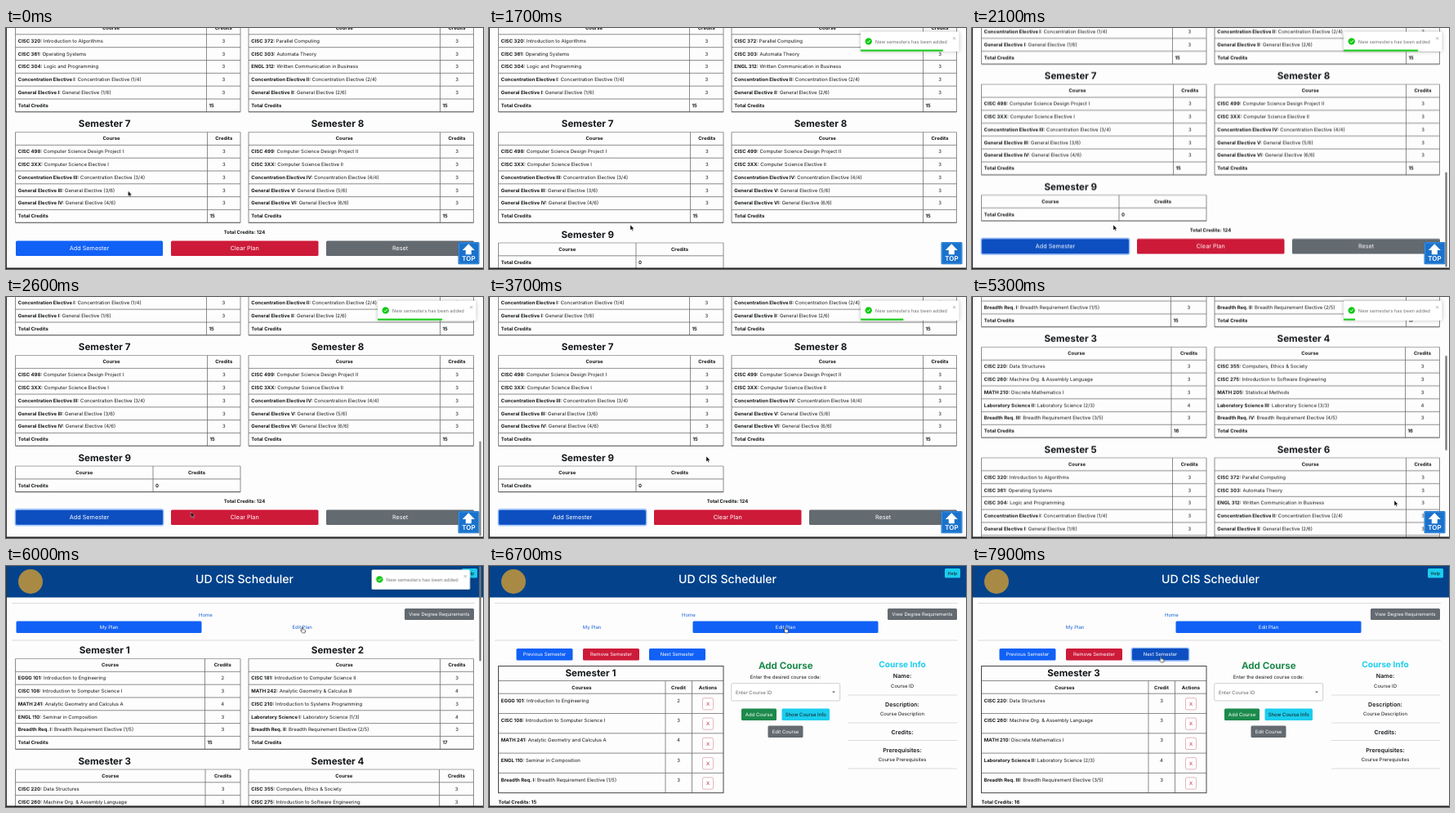
Recreate the animation shown at these times as an HTML page. Size 584 by 295 pixels, loop 8000 ms.

```html
<!DOCTYPE html>
<html lang="en">
<head>
<meta charset="utf-8">
<title>Scheduler</title>
<style>
html, body { margin: 0; width: 100%; height: 100%; overflow: hidden; background: #fdfdfd; }
svg { display: block; width: 584px; height: 295px; font-family: Inter, Roboto, sans-serif; text-rendering: geometricPrecision; }
.loop, .step { animation: 8s linear infinite; }
.step { animation-timing-function: step-end; }

#page { animation-name: scroll; }
@keyframes scroll {
  0%, 21.5% { transform: translateY(-392.5px); animation-timing-function: ease-in-out; }
  25.9%, 26.4% { transform: translateY(-451px); animation-timing-function: ease-out; }
  30%, 58.75% { transform: translateY(-448.5px); animation-timing-function: cubic-bezier(.35, .15, .7, .7); }
  66.25% { transform: translateY(-188.3px); animation-timing-function: cubic-bezier(.3, .4, .6, 1); }
  71.5%, 100% { transform: translateY(0); }
}
#bar { animation-name: thumb, bar; }
@keyframes thumb {
  0%, 21.5% { transform: translateY(155px); animation-timing-function: ease-in-out; }
  25.9%, 58.75% { transform: translateY(176px); animation-timing-function: cubic-bezier(.35, .15, .7, .7); }
  66.25% { transform: translateY(71.5px); animation-timing-function: cubic-bezier(.3, .4, .6, 1); }
  71.5%, 100% { transform: translateY(0); }
}
@keyframes bar {
  0%, 21.5% { opacity: 0; }
  22.5%, 32% { opacity: 1; }
  35.5%, 58% { opacity: 0; }
  58.75%, 76.5% { opacity: 1; }
  79.5%, 100% { opacity: 0; }
}
#top { animation-name: until-top; }
@keyframes until-top { 0% { visibility: visible; } 68.75%, 100% { visibility: hidden; } }
#plan { animation-name: plan; }
@keyframes plan { 0% { visibility: visible; } 82.5%, 100% { visibility: hidden; } }
#edit { animation-name: edit; }
@keyframes edit { 0% { opacity: 0; } 82.5%, 100% { opacity: 1; } }
#sem9 { animation-name: sem9; }
@keyframes sem9 { 0% { opacity: 0; } 11.25%, 100% { opacity: 1; } }
#foot { animation-name: foot; }
@keyframes foot { 0% { transform: none; } 11.25%, 100% { transform: translateY(56px); } }
#e1 { animation-name: e1; }
@keyframes e1 { 0% { opacity: 1; } 93.75%, 100% { opacity: 0; } }
#e2 { animation-name: e2; }
@keyframes e2 { 0% { opacity: 0; } 93.75% { opacity: 1; } 97.5%, 100% { opacity: 0; } }
#e3 { animation-name: e3; }
@keyframes e3 { 0% { opacity: 0; } 97.5%, 100% { opacity: 1; } }

#add { animation-name: add; }
@keyframes add { 0%, 6% { fill: #1161f6; } 7.8%, 100% { fill: #0d4fc0; } }
#addRing { animation-name: add-ring; }
@keyframes add-ring { 0%, 10% { opacity: 0; } 11%, 100% { opacity: 1; } }
#clear { animation-name: clear; }
@keyframes clear { 0%, 33% { fill: #cd1a39; } 35%, 39% { fill: #b0152f; } 41%, 100% { fill: #cd1a39; } }
#next { animation-name: next; }
@keyframes next { 0%, 91% { fill: #1161f6; } 92.8%, 100% { fill: #0d4fc0; } }
#nextRing { animation-name: next-ring; }
@keyframes next-ring { 0%, 93% { opacity: 0; } 94.5%, 100% { opacity: 1; } }

#toast { animation-name: toast; }
@keyframes toast {
  0%, 11.25% { transform: translateX(1125px); animation-timing-function: cubic-bezier(.215, .61, .355, 1); }
  16.5% { transform: translateX(-9.4px); animation-timing-function: cubic-bezier(.215, .61, .355, 1); }
  17.8% { transform: translateX(3.75px); animation-timing-function: cubic-bezier(.215, .61, .355, 1); }
  19.1% { transform: translateX(-1.9px); animation-timing-function: cubic-bezier(.215, .61, .355, 1); }
  20%, 73.5% { transform: none; opacity: 1; animation-timing-function: ease; }
  75.25% { transform: translateX(-7.5px); opacity: 1; animation-timing-function: ease; }
  82.25%, 100% { transform: translateX(750px); opacity: 0; }
}
#progress { animation-name: progress; transform-box: fill-box; transform-origin: left; }
@keyframes progress { 0%, 11% { transform: scaleX(1); } 73.5%, 100% { transform: scaleX(0); } }

#cursor { animation-name: cursor; animation-timing-function: ease-in-out; }
@keyframes cursor {
  0%, 1% { transform: translate(149.5px, 199.5px); }
  7.5%, 14.5% { transform: translate(131px, 267px); }
  20.5%, 28.5% { transform: translate(173px, 241px); }
  34%, 38% { transform: translate(236px, 267px); }
  45%, 49% { transform: translate(266px, 195px); }
  58%, 68.5% { transform: translate(517px, 249px); }
  74%, 86% { transform: translate(362px, 74.5px); }
  92.5%, 100% { transform: translate(230.5px, 110.5px); }
}
#arrow { animation-name: arrow; }
@keyframes arrow {
  0% { opacity: 1; } 6.3% { opacity: 0; } 11.25% { opacity: 1; } 33% { opacity: 0; } 39.3% { opacity: 1; }
  73% { opacity: 0; } 88% { opacity: 1; } 91.3%, 100% { opacity: 0; }
}
#hand { animation-name: hand; }
@keyframes hand {
  0% { opacity: 0; } 6.3% { opacity: 1; } 11.25% { opacity: 0; } 33% { opacity: 1; } 39.3% { opacity: 0; }
  73% { opacity: 1; } 88% { opacity: 0; } 91.3%, 100% { opacity: 1; }
}
</style>
</head>
<body>
<svg id="stage" viewBox="0 0 584 295"></svg>
<script>
const BLUE = '#1161f6', RED = '#cd1a39', GRAY = '#636a70', GREEN = '#1c8a4c', CYAN = '#1bcdee';
const INK = '#15181b', LINK = '#1a62d6', BODY = 5.96, HEAD = 11.6;

const plan = [
  [15, 243.5, 'EGGG 101|Introduction to Engineering|2', 'CISC 108|Introduction to Somputer Science I|3',
    'MATH 241|Analytic Geometry and Calculus A|4', 'ENGL 110|Seminar in Composition|3',
    'Breadth Req. I|Breadth Requirement Elective (1/5)|3'],
  [17, 531.5, 'CISC 181|Introduction to Computer Science II|3', 'MATH 242|Analytic Geometry & Calculus B|4',
    'CISC 210|Introduction to Systems Programming|3', 'Laboratory Science I|Laboratory Science (1/3)|4',
    'Breadth Req. II|Breadth Requirement Elective (2/5)|3'],
  [16, 244, 'CISC 220|Data Structures|3', 'CISC 260|Machine Org. & Assembly Language|3',
    'MATH 210|Discrete Mathematics I|3', 'Laboratory Science II|Laboratory Science (2/3)|4',
    'Breadth Req. III|Breadth Requirement Elective (3/5)|3'],
  [16, 530.5, 'CISC 355|Computers, Ethics & Society|3', 'CISC 275|Introduction to Software Engineering|3',
    'MATH 205|Statistical Methods|3', 'Laboratory Science III|Laboratory Science (3/3)|4',
    'Breadth Req. IV|Breadth Requirement Elective (4/5)|3'],
  [15, 245.5, 'CISC 320|Introduction to Algorithms|3', 'CISC 361|Operating Systems|3',
    'CISC 304|Logic and Programming|3', 'Concentration Elective I|Concentration Elective (1/4)|3',
    'General Elective I|General Elective (1/6)|3'],
  [15, 531.5, 'CISC 372|Parallel Computing|3', 'CISC 303|Automata Theory|3',
    'ENGL 312|Written Communication in Business|3', 'Concentration Elective II|Concentration Elective (2/4)|3',
    'General Elective II|General Elective (2/6)|3'],
  [15, 246.5, 'CISC 498|Computer Science Design Project I|3', 'CISC 3XX|Computer Science Elective I|3',
    'Concentration Elective III|Concentration Elective (3/4)|3', 'General Elective III|General Elective (3/6)|3',
    'General Elective IV|General Elective (4/6)|3'],
  [15, 531.5, 'CISC 499|Computer Science Design Project II|3', 'CISC 3XX|Computer Science Elective II|3',
    'Concentration Elective IV|Concentration Elective (4/4)|3', 'General Elective V|General Elective (5/6)|3',
    'General Elective VI|General Elective (6/6)|3'],
  [0, 180]
];

const esc = s => String(s).replace(/&/g, '&amp;');
const raw = (x, y, html, size, weight, fill, anchor) =>
  `<text x="${x}" y="${y + size * .364}" font-size="${size}" font-weight="${weight}" fill="${fill}" text-anchor="${anchor}">${html}</text>`;
const left = (x, y, s, weight = 400, fill = INK, size = BODY) => raw(x, y, esc(s), size, weight, fill, 'start');
const mid = (x, y, s, weight = 400, fill = INK, size = BODY) => raw(x, y, esc(s), size, weight, fill, 'middle');
const rect = (x, y, w, h, fill, attrs = '') => `<rect x="${x}" y="${y}" width="${w}" height="${h}" fill="${fill}" ${attrs}/>`;
const path = (d, stroke = '#666', w = .75) => `<path d="${d}" fill="none" stroke="${stroke}" stroke-width="${w}"/>`;
const rule = (x1, x2, y) => path(`M${x1} ${y}H${x2}`, '#ccc', .7);
const group = (id, cls, html) => `<g id="${id}" class="${cls}">${html}</g>`;
const ring = (id, x, y, w, h) =>
  rect(x - .6, y - .6, w + 1.2, h + 1.2, 'none', `rx="2" id="${id}" class="loop" stroke="#86b3fb" stroke-width="1.4"`);

function button(x, y, w, h, label, fill, { id = '', ink = '#fff', size = BODY } = {}) {
  const anim = id && `id="${id}" class="loop"`;
  return rect(x, y, w, h, fill, `rx="1.5" ${anim}`) + mid(x + w / 2, y + h / 2, label, 400, ink, size);
}

function course(x, y, row) {
  const [code, name] = row.split('|');
  return raw(x, y, `<tspan font-weight="700">${code}:</tspan> ${esc(name)}`, BODY, 400, INK, 'start');
}

function semester(i) {
  const [total, split, ...rows] = plan[i];
  const x = i % 2 ? 297 : 11.5, end = x + 275.5, pitch = 15.82;
  const head = 103 + 135.5 * (i >> 1), top = head + 10.5;
  const rowY = n => top + pitch * n + 7.7;
  const cx = (split + end) / 2, last = rows.length + 1;
  const headY = rowY(0) - .3, bottom = top + pitch * (last + 1);
  let out = mid(i % 2 ? 406 : 120.7, head, 'Semester ' + (i + 1), 700, INK, HEAD);
  out += mid((x + split) / 2, headY, 'Course', 700) + mid(cx, headY, 'Credits', 700);
  rows.forEach((row, n) => {
    out += course(x + 3.3, rowY(n + 1), row) + mid(cx, rowY(n + 1), row.split('|')[2]);
  });
  out += left(x + 3.3, rowY(last), 'Total Credits', 700) + left(split + 3, rowY(last), total, 700);
  for (let n = 1; n <= last; n++) out += path(`M${x} ${top + pitch * n}H${end}`);
  return out + path(`M${x} ${top}H${end}`, '#888')
    + path(`M${x} ${top}V${bottom}M${split} ${top}V${bottom}M${end} ${top}V${bottom}`)
    + path(`M${x} ${bottom}H${end}`, '#444', 1);
}

function editTable(i) {
  const [total, , ...rows] = plan[i];
  let out = mid(124.5, 130.5, 'Semester ' + (i + 1), 700, INK, HEAD);
  rows.forEach((row, n) => {
    const y = 164.5 + 24.3 * n;
    out += course(14.8, y, row) + mid(232, y, row.split('|')[2]);
  });
  return out + left(11.5, 289, 'Total Credits: ' + total, 700);
}

function header() {
  return rect(0, 0, 584, 38.5, '#04438c')
    + '<circle cx="30" cy="19" r="15" fill="#a88a45"/>'
    + mid(292, 16, 'UD CIS Scheduler', 500, '#fff', 14.1)
    + button(558, 3, 19, 11.5, 'Help', CYAN, { ink: INK, size: 5.4 })
    + rule(7, 574, 45.5) + rule(7, 574, 91)
    + mid(244.3, 59.5, 'Home', 400, LINK)
    + button(488, 52, 85, 14, 'View Degree Requirements', GRAY, { size: 5.8 });
}

function planPage() {
  const big = { size: 7.25 };
  const foot = mid(292, 642, 'Total Credits: 124', 700)
    + button(12, 653, 180, 18.5, 'Add Semester', BLUE, { id: 'add', ...big })
    + ring('addRing', 12, 653, 180, 18.5)
    + button(202, 653, 180.5, 18.5, 'Clear Plan', RED, { id: 'clear', ...big })
    + button(392, 653, 181, 18.5, 'Reset', GRAY, big);
  return button(12.5, 67.5, 227, 14.5, 'My Plan', BLUE) + mid(362.7, 74.8, 'Edit Plan', 400, LINK)
    + plan.slice(0, 8).map((_, i) => semester(i)).join('')
    + group('sem9', 'step', semester(8)) + group('foot', 'step', foot);
}

function editPage() {
  let out = mid(126, 74.8, 'My Plan', 400, LINK) + button(249.5, 67.5, 227, 14.5, 'Edit Plan', BLUE)
    + button(33.5, 101, 69, 14.5, 'Previous Semester', BLUE)
    + button(115, 101, 69, 14.5, 'Remove Semester', RED)
    + button(196, 101, 69, 14.5, 'Next Semester', BLUE, { id: 'next' })
    + ring('nextRing', 196, 101, 69, 14.5)
    + mid(113.5, 148.5, 'Courses', 700) + mid(232, 148.5, 'Credit', 700) + mid(268, 148.5, 'Actions', 700)
    + path('M11.5 140.5H287') + path('M216 140.5V277.7M248.5 140.5V277.7');
  for (let n = 0; n < 5; n++) {
    const y = 156.2 + 24.3 * n;
    out += path(`M11.5 ${y}H287`)
      + rect(261.5, y + 5.5, 13, 14.2, '#fff', 'rx="1.5" stroke="#d59aa4" stroke-width=".7"')
      + mid(268, y + 12.7, 'X', 400, RED);
  }
  out += rect(11.5, 122.5, 275.5, 155.2, 'none', 'stroke="#444"')
    + [0, 1, 2].map(i => group('e' + (i + 1), 'step', editTable(i))).join('');

  out += mid(363.3, 121.5, 'Add Course', 700, GREEN, HEAD)
    + mid(363, 136, 'Enter the desired course code:')
    + rect(296.7, 143.7, 133, 21.3, '#fff', 'rx="1.5" stroke="#bbb" stroke-width=".7"')
    + left(302, 154.5, 'Enter Course ID', 400, '#666')
    + '<path d="M420 153.5h4l-2 2z" fill="#666"/>'
    + button(309, 174.5, 43, 14.5, 'Add Course', GREEN)
    + button(358.5, 174.5, 58.5, 14.5, 'Show Course Info', CYAN, { ink: INK })
    + button(341.5, 195.5, 43, 14.5, 'Edit Course', GRAY);

  out += mid(506, 120.5, 'Course Info', 700, CYAN, 10.15);
  [['Name:', 134.5], ['Description:', 169], ['Credits:', 203], ['Prerequisites:', 225]]
    .forEach(([s, y]) => out += mid(506, y, s, 600, INK, 7.1));
  [['Course ID', 147], ['Course Description', 181], ['Course Prerequisites', 237]]
    .forEach(([s, y]) => out += mid(506, y, s));
  return out + [158, 192, 213.5, 248].map(y => rule(440, 573, y)).join('');
}

function toast() {
  return rect(455, 4.5, 120.5, 24.3, '#fff', 'rx="1.5" style="filter:drop-shadow(0 .4px 2px #0004)"')
    + '<circle cx="464.7" cy="16.4" r="4.2" fill="#14c914"/>' + path('M462.8 16.5l1.4 1.4 2.5-2.9', '#fff', .9)
    + left(472.8, 16.4, 'New semesters has been added', 400, '#757575', 5.8)
    + path('M568 11l3.2 3.2m0-3.2l-3.2 3.2', '#999', .7)
    + rect(455, 26.5, 120.5, 2.1, '#14c914', 'id="progress" class="loop"');
}

const topButton = rect(553.5, 262, 26, 27.3, '#1a72cc', 'rx="1.5"')
  + rect(554.5, 263, 24, 25.3, 'none', 'rx="1" stroke="#5aa3e6" stroke-width=".6"')
  + '<path d="M566.3 264.3l7.5 7.7h-4v5.2h-7v-5.2h-4z" fill="#fff"/>'
  + mid(566.4, 282.2, 'TOP', 600, '#fff', 8);

const cursor = group('arrow', 'step',
    '<path d="M0 0V6.6L1.6 5.2 2.6 7.5 3.6 7 2.6 4.8H4.7Z" stroke="#fff" stroke-width=".4"/>')
  + group('hand', 'step',
    '<path d="M0 .6q.7-1 1.3 0v2.4l2.6.6q.8.3.7 1.2l-.5 2.4H.7l-2-2.8q.1-.9 1.3 0z" fill="#fff" stroke="#000" stroke-width=".6"/>');

document.getElementById('stage').innerHTML = rect(0, 0, 584, 295, '#fdfdfd')
  + group('page', 'loop', header() + group('plan', 'step', planPage()) + group('edit', 'step', editPage()))
  + group('top', 'step', topButton)
  + rect(579.4, .5, 2.3, 116, '#777', 'rx="1.1" id="bar" class="loop"')
  + group('toast', 'loop', toast())
  + rect(0, 0, 1, 295, '#333') + rect(0, 293.5, 584, 1.5, '#222')
  + group('cursor', 'loop', cursor);
</script>
</body>
</html>
```
